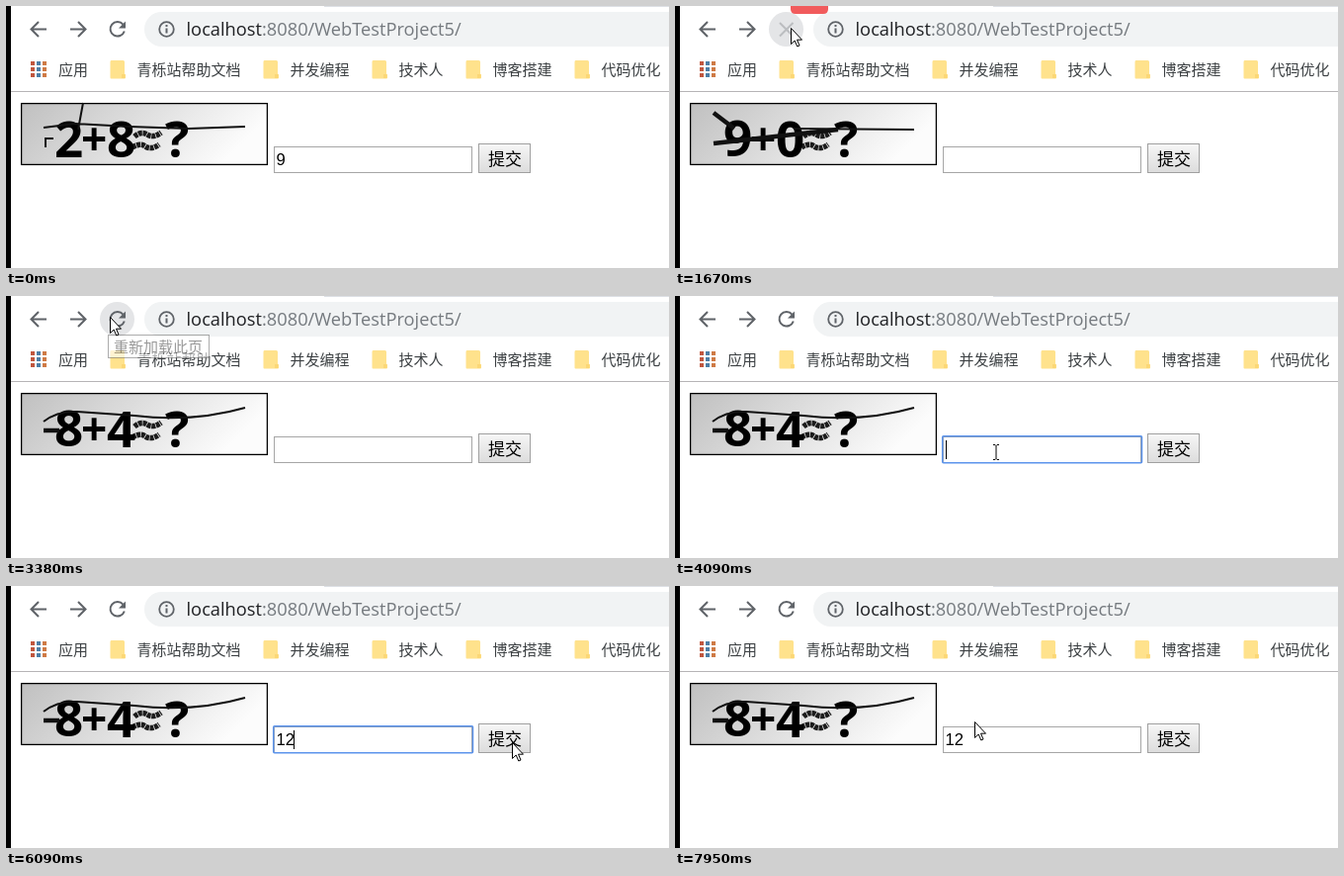
Write an HTML page that moves like this. It is 671 by 265 pixels and loops after 8000 ms.

```html
<!DOCTYPE html>
<html lang="zh">
<head>
<meta charset="utf-8">
<style>
html, body { margin: 0; width: 100%; height: 100%; overflow: hidden; background: #fff; }
svg { display: block; }
text { font-family: "Noto Sans CJK SC", "Noto Sans CJK", sans-serif; font-size: 15px; fill: #3c4043; white-space: pre; }
.url { font: 18.25px "Open Sans", sans-serif; fill: #757a7f; }
.url .host { fill: #202124; }
.result { font: 20.3px "Open Sans", sans-serif; fill: #000; }
.field text { font: 16.67px "Liberation Sans", Arial, sans-serif; fill: #000; }
.list text { font: 16px "Open Sans", sans-serif; fill: #1c1c4a; }
.code text { font: bold 51px "Open Sans", sans-serif; fill: #000; }
.icon { fill: none; stroke: #5f6368; stroke-width: 2; }
.ink { fill: none; stroke: #111; stroke-width: 2; }
.tip rect { fill: #fff; stroke: #767676; }
.tip text { fill: #575757; }
.list rect { fill: #fff; filter: drop-shadow(0 1px 2px rgba(0,0,0,.4)); }
.caret { fill: #000; }
</style>
</head>
<body>
<svg width="671" height="265" viewBox="0 0 671 265">
  <defs>
    <linearGradient id="silver" x2="1" y2=".25">
      <stop stop-color="#c0c0c0"/><stop offset="1" stop-color="#fcfcfc"/>
    </linearGradient>
    <linearGradient id="face" x2="0" y2="1">
      <stop stop-color="#f6f6f6"/><stop offset="1" stop-color="#dcdcdc"/>
    </linearGradient>
    <filter id="soft"><feGaussianBlur stdDeviation=".7"/></filter>
    <g id="folder">
      <path d="M1.500 0H13.500Q15 0 15 1.500V13.500L16 14.500V17.500Q16 18.500 15 18.500H1.500Q.5 18.500 .5 17.500V1.500Q.5 0 1.500 0Z" fill="#ffe28c"/>
      <path d="M12 14H15.500V18H12Z" fill="#fbd775"/>
    </g>
  </defs>

  <!-- browser bar -->
  <path d="M322 .5H671" stroke="#dee1e6"/>
  <rect x="140" y="6" width="560" height="35" rx="17.5" fill="#f1f3f4"/>
  <circle cx="112.5" cy="23.5" r="17.5" fill="#e4e5e7" data-on="1670-1980 3230-3620"/>
  <path class="icon" d="M41 23.5H26M33 16L25.5 23.5L33 31"/>
  <path class="icon" id="forward" d="M65 23.5H80M73 16L80.5 23.5L73 31"/>
  <g data-on="0-980 2620-8000">
    <path class="icon" d="M118.5 18.6A7.3 7.3 0 1 0 119.8 25.5"/>
    <path d="M121 15.5V22.5H114Z" fill="#5f6368"/>
  </g>
  <path class="icon" d="M106 17L119.5 30.5M119.5 17L106 30.5" data-on="980-1520"/>
  <path class="icon" d="M106 17L119.5 30.5M119.5 17L106 30.5" style="stroke:#bbbdc0" data-on="1520-2620"/>
  <circle class="icon" cx="162.5" cy="23.5" r="7.3" style="stroke-width:1.8"/>
  <path class="icon" d="M162.5 22.5V27.5M162.5 19V21"/>
  <text class="url" x="182.5" y="30"><tspan class="host">localhost</tspan>:8080/WebTestProject5/<tspan data-on="6240-7320">check.jsp?code=12</tspan></text>
  <path d="M117 0H155V3Q155 8 150 8H122Q117 8 117 3Z" fill="#f15b5c" data-on="1210-1900"/>

  <!-- bookmarks -->
  <rect x="95" y="46" width="150" height="35" rx="17.5" fill="#f4f5f6" data-on="6730-6870"/>
  <g id="apps"></g>
  <g id="marks"></g>
  <path d="M5 86.5H671" stroke="#b6b4b6"/>

  <!-- form page -->
  <g data-on="0-6240 7320-8000">
    <rect x="15.6" y="98.6" width="248.8" height="61.8" fill="url(#silver)" stroke="#000" stroke-width="1.3"/>
    <g class="code" filter="url(#soft)">
      <text x="76" y="151" style="font-size:46px">+</text>
      <path d="M130 132Q137 126 143 130T157 128M128 143Q135 138 141 142T155 140" fill="none" stroke="#1c1c1c" stroke-width="5.5" stroke-dasharray="4 .7"/>
      <text x="161" y="153">?</text>
      <g data-on="0-1670"><text x="49" y="153">2</text><text x="102" y="153">8</text></g>
      <g data-on="1670-3230"><text x="49" y="152">9</text><text x="102" y="153">0</text></g>
      <g data-on="3230-8000"><text x="49" y="152">8</text><text x="102" y="153">4</text></g>
    </g>
    <g class="ink">
      <path d="M40 143V134H48M38 123L70 119L125 122L185 124L242 122M78 98L73 125" data-on="0-1670"/>
      <g data-on="1670-3230">
        <path d="M39 108L60 124M39 139L110 131L165 125" stroke-width="4.5"/>
        <path d="M120 124L242 125"/>
      </g>
      <g data-on="3230-8000">
        <path d="M38 127Q52 116 72 117L130 121Q190 128 242 113"/>
        <path d="M38 136H54" stroke-width="4.5"/>
      </g>
    </g>
    <g class="field">
      <rect x="271.5" y="142.5" width="200" height="26" fill="#fff" stroke="#a6a6a6"/>
      <rect x="270.7" y="141.7" width="201.8" height="27" rx="1" fill="none" stroke="#5b93ec" stroke-width="1.5" data-on="4090-6240"/>
      <text x="273.5" y="161" data-on="0-1670">9</text>
      <text x="273.5" y="161" data-on="4930-5080">1</text>
      <text x="273.5" y="161" data-on="5080-8000">12</text>
      <rect class="caret" x="274" y="146" width="1" height="19" data-on="4090-4700"/>
      <rect class="caret" x="281" y="146" width="1" height="19" data-on="4930-5080"/>
      <rect class="caret" x="291" y="146" width="1" height="19" data-on="5080-6240"/>
    </g>
    <rect x="478.5" y="139.5" width="52" height="29" fill="url(#face)" stroke="#a0a0a0"/>
    <text x="488" y="161" style="font-size:17px;fill:#000">提交</text>
    <g class="list" data-on="4160-4930">
      <rect x="270" y="169" width="202.5" height="98" rx="4"/>
      <text x="285.5" y="207">10</text><text x="285.5" y="239">9</text>
    </g>
    <g class="list" data-on="4930-5080">
      <rect x="270" y="169" width="202.5" height="66" rx="4"/>
      <text x="285.5" y="207">10</text>
    </g>
  </g>

  <!-- answer page -->
  <text class="result" x="15" y="119" data-on="6240-7320">true 12<tspan letter-spacing="2.2">---</tspan>12</text>

  <g class="tip" id="stopTip">
    <rect x="122.5" y="42.5" width="96" height="23"/><text x="126" y="60">停止加载此页</text>
  </g>
  <g class="tip" id="reloadTip">
    <rect x="103.5" y="39.5" width="102" height="23"/><text x="109" y="57">重新加载此页</text>
  </g>
  <rect width="5" height="265" fill="#000"/>

  <g id="pointer">
    <path d="M.5 .5V16.5L4.2 13L6.8 19L9 18L6.5 12.2H11.5Z" fill="#fff" stroke="#000" data-on="210-4090 5700-8000"/>
    <path d="M-3 -7.5H-1L0 -6.5L1 -7.5H3M0 -6.5V6.5M-3 7.5H-1L0 6.5L1 7.5H3" fill="none" stroke="#000" data-on="4090-5700"/>
  </g>
</svg>
<script>
const LOOP = 8000;
const $ = id => document.getElementById(id);

const columns = ['#c0563e', '#4c7fa8', '#cf7a45'];
$('apps').innerHTML = Array.from({ length: 9 }, (_, i) =>
  `<rect x="${25 + i % 3 * 6}" y="${56 + Math.floor(i / 3) * 6}" width="4" height="4" fill="${columns[i % 3]}"/>`).join('');

const marks = [[105, '青栎站帮助文档'], [260, '并发编程'], [370, '技术人'], [465, '博客搭建'], [575, '代码优化']];
$('marks').innerHTML = '<text x="53" y="70">应用</text>' + marks.map(([x, name]) =>
  `<use href="#folder" x="${x}" y="55"/><text x="${x + 27.5}" y="70">${name}</text>`).join('');

// Each key is [time, ...values]
const path = [
  [210, 339, 149], [840, 112, 27], [1130, 112, 27], [1360, 117, 22], [2460, 117, 22],
  [2770, 159, 61], [3000, 105, 21], [3540, 105, 21], [4010, 313, 138], [4090, 325, 158],
  [5550, 325, 158], [5860, 430, 177], [6100, 515, 157], [6420, 515, 157],
  [6780, 107, 53], [7020, 28, 21], [7320, 28, 21], [7950, 303, 137]
];
const stopFade = [[1900, 0], [2060, .9], [2210, .9], [2370, .06], [3150, .06], [3230, 0]];
const reloadFade = [[3230, 0], [3380, .6], [3460, 1], [3540, 1], [3620, 0]];

function at(keys, t) {
  const next = keys.findIndex(k => k[0] > t);
  if (next === 0) return keys[0].slice(1);
  if (next < 0) return keys[keys.length - 1].slice(1);
  const a = keys[next - 1], b = keys[next];
  const p = (t - a[0]) / (b[0] - a[0]);
  return a.slice(1).map((v, i) => v + (b[i + 1] - v) * p);
}

const timed = [...document.querySelectorAll('[data-on]')].map(el => ({
  el, spans: el.dataset.on.split(' ').map(s => s.split('-').map(Number))
}));

function draw(now) {
  const t = now % LOOP;
  for (const { el, spans } of timed)
    el.style.display = spans.some(([from, to]) => t >= from && t < to) ? '' : 'none';
  const [x, y] = at(path, t).map(Math.round);
  $('pointer').setAttribute('transform', `translate(${x} ${y})`);
  $('stopTip').style.opacity = at(stopFade, t)[0];
  $('reloadTip').style.opacity = at(reloadFade, t)[0];
  $('forward').style.stroke = t >= 6240 && t < 7320 ? '#bbbdc0' : '';
  requestAnimationFrame(draw);
}
draw(performance.now());
</script>
</body>
</html>
```
